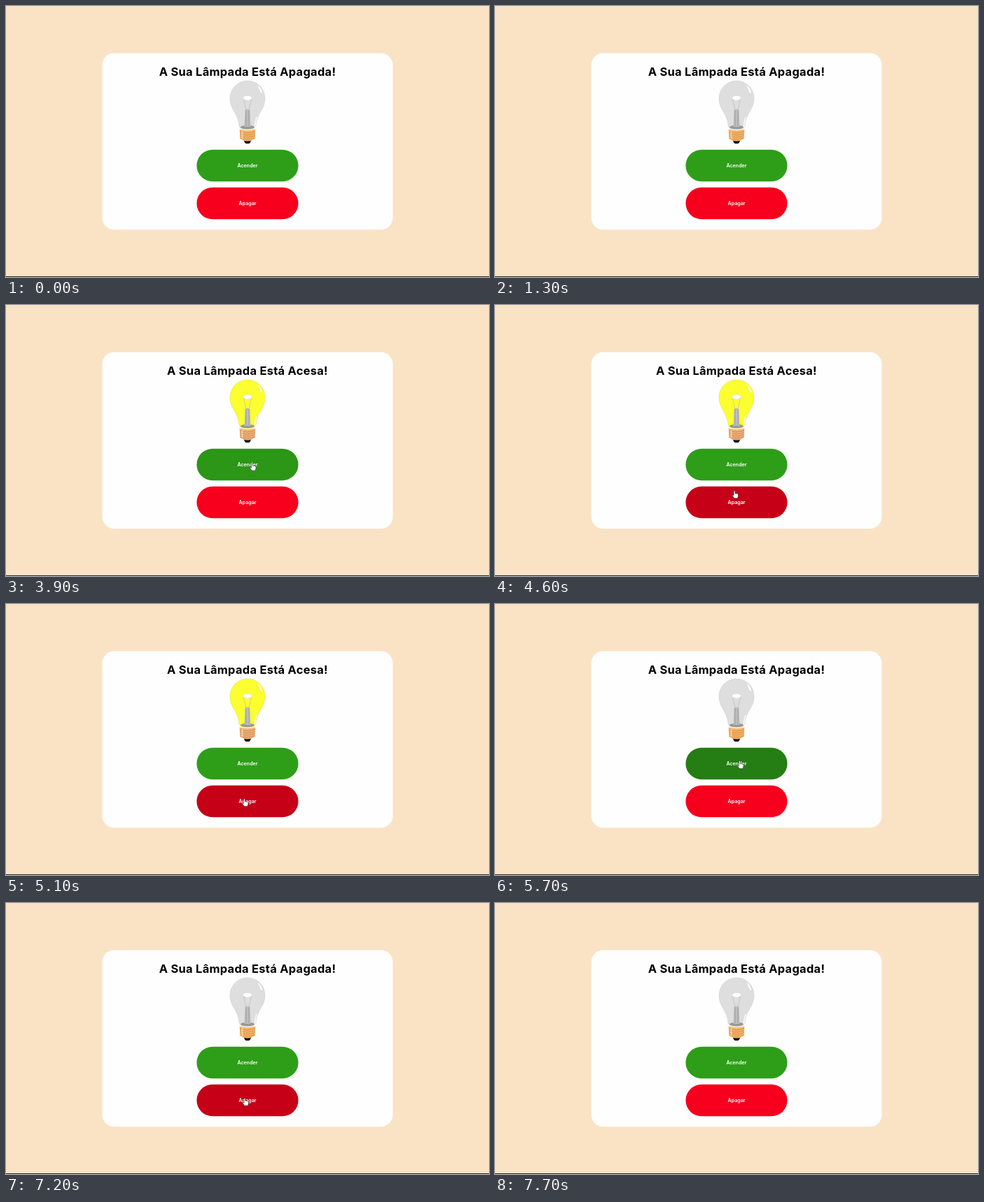
Animation, 690 px wide and 388 px high, one loop 8500 ms. Source, as an HTML page:

```html
<!DOCTYPE html>
<html lang="pt">
<head>
<meta charset="utf-8">
<title>Lâmpada</title>
<style>
  html, body { margin: 0; width: 100%; height: 100%; overflow: hidden; background: #fae3c5; }
  svg { display: block; width: 690px; height: 388px; }
  text { font-family: Inter, "Open Sans", sans-serif; text-anchor: middle; }
  #title { font-size: 16.5px; font-weight: 700; letter-spacing: .25px; }
  .label { font-size: 7.1px; font-weight: 600; fill: #fff; }
</style>
</head>
<body>
<svg viewBox="0 0 690 388">
  <rect width="690" height="388" fill="#fae3c5"/>
  <rect y="387" width="690" height="1" fill="#2b2b2b"/>
  <rect x="137.5" y="67.5" width="415" height="252.7" rx="17" fill="#fefefe"/>
  <text id="title" x="345" y="100.2"></text>

  <!-- Bulb, centred on the middle of its glass ball -->
  <g transform="translate(345 132)">
    <path id="glass" stroke-width=".5" d="M-11.8 40C-13 21 -25 17 -25 0A25 25 0 0 1 25 0C25 17 13 21 11.8 40Q11 45 0 45T-11.8 40Z"/>
    <path d="M14.5 -18.5Q20.5 -14 21 -7Q18.5 -7.5 17 -12.5Z" fill="#fff"/>
    <path d="M13 27Q10.4 35 10.4 42" fill="none" stroke="#fff" stroke-width="1.3"/>
    <ellipse cy="41.5" rx="10" ry="2.8" fill="#999"/>
    <path d="M-6 0L-2 17M6 0L2 17" stroke="#b4b4b4" stroke-width=".6"/>
    <path d="M-3.5 17Q0 14 3.5 17L4.5 41H-4.5Z" fill="#bebebe"/>
    <path d="M-2 17V40M2 17V40" stroke="#929292" stroke-width=".7"/>
    <ellipse cy="-.3" rx="6.5" ry="3.4" fill="#fff" stroke="#ccc" stroke-width=".5"/>
    <path d="M-5.5 60H5.5L3.5 64.2Q0 66 -3.5 64.2Z" fill="#171310"/>
    <path id="base" d="M-11.4 44.5Q0 48 11.4 44.5L10.5 58Q0 65 -10.5 58Z"/>
    <g id="threads" fill="none" stroke="#b87439" stroke-width=".6"></g>
    <path d="M-7.5 47.5V58" stroke="#ffe6bd" stroke-width="1.8" opacity=".7"/>
  </g>

  <g id="buttons"></g>

  <g id="cursor" stroke="#222" stroke-width=".6" stroke-linejoin="round" fill="#fff">
    <path id="arrow" d="M0 0V9.2L2.2 7.2L3.7 10.6L5.2 9.9L3.7 6.7H6.7Z"/>
    <path id="hand" d="M-1 1Q0 -.6 1 1V4.2Q5.6 4 5.6 6.3Q5.7 8.7 4.5 11.2H-.5Q-1.3 9.2 -3 7.4Q-3 5.9 -1 7Z"/>
  </g>
</svg>
<script>
const LOOP = 8500, STEP = 100, FADE = 120;
const clicks = [3900, 5200, 6000, 7200];

// Where the cursor rests; it moves straight from one stop to the next
const stops = [
  { from: 2800, to: 3100, x: 441, y: 226 },
  { from: 3400, to: 3850, x: 445, y: 248 },
  { from: 3900, to: 3900, x: 351.5, y: 226 },
  { from: 4100, to: 4400, x: 343, y: 257 },
  { from: 4900, to: 5300, x: 340.5, y: 278.5 },
  { from: 5600, to: 5900, x: 349.5, y: 224.5 },
  { from: 6450, to: 7200, x: 341, y: 279 },
  { from: 7500, to: 7500, x: 13, y: 215 }
];
const buttons = [
  { text: 'Acender', y: 205.7, color: [46, 158, 24] },
  { text: 'Apagar', y: 259.8, color: [247, 0, 29] }
];
const LEFT = 272.4, WIDTH = 145.2, HEIGHT = 45.5;

const el = id => document.getElementById(id);
const set = (id, name, value) => el(id).setAttribute(name, value);
const lerp = (a, b, p) => a + (b - a) * p;
const smooth = p => p * p * (3 - 2 * p);

function cursorAt(t) {
  const i = stops.findIndex(s => t <= s.to);
  if (i < 0 || t < stops[0].from) return null;
  const b = stops[i], a = stops[i - 1] || b;
  const p = t >= b.from ? 1 : (t - a.to) / (b.from - a.to);
  return { x: lerp(a.x, b.x, p), y: lerp(a.y, b.y, p) };
}

function isOver(button, point) {
  return point !== null && Math.abs(point.x - LEFT - WIDTH / 2) < WIDTH / 2
    && Math.abs(point.y - button.y - HEIGHT / 2) < HEIGHT / 2;
}

// Share of the last FADE ms that the cursor spent on the button
function hover(button, t) {
  const samples = 12;
  let hits = 0;
  for (let i = 0; i < samples; i++) {
    hits += isOver(button, cursorAt(t - FADE * i / samples));
  }
  return smooth(hits / samples);
}

function build() {
  el('buttons').innerHTML = buttons.map((b, i) => `
    <rect id="button${i}" x="${LEFT}" y="${b.y}" width="${WIDTH}" height="${HEIGHT}" rx="${HEIGHT / 2}"/>
    <text class="label" x="345" y="${b.y + 24.8}">${b.text}</text>`).join('');
  for (let y = 48; y < 59; y += 3) {
    el('threads').innerHTML += `<path d="M-11 ${y}Q0 ${y + 4} 11 ${y - .5}"/>`;
  }
}

function drawLamp(on) {
  el('title').textContent = `A Sua Lâmpada Está ${on ? 'Acesa' : 'Apagada'}!`;
  set('glass', 'fill', on ? '#fbff2f' : '#dedede');
  set('glass', 'stroke', on ? '#d9d943' : '#c9c9c9');
  set('base', 'fill', on ? '#efb07a' : '#f7b565');
}

function drawCursor(point) {
  set('cursor', 'visibility', point ? 'visible' : 'hidden');
  if (!point) return;
  const over = buttons.some(b => isOver(b, point));
  set('cursor', 'transform', `translate(${point.x} ${point.y})`);
  set('arrow', 'display', over ? 'none' : 'inline');
  set('hand', 'display', over ? 'inline' : 'none');
}

function draw(time) {
  const t = Math.floor(time % LOOP / STEP) * STEP;
  drawLamp(clicks.filter(c => c <= t).length % 2 === 1);
  buttons.forEach((b, i) => {
    const shade = 1 - .2 * hover(b, t);
    set(`button${i}`, 'fill', `rgb(${b.color.map(c => Math.round(c * shade))})`);
  });
  drawCursor(t < LOOP - 1000 ? cursorAt(t) : null);
}

function tick() {
  draw(performance.now());
  requestAnimationFrame(tick);
}
build();
tick();
</script>
</body>
</html>
```
